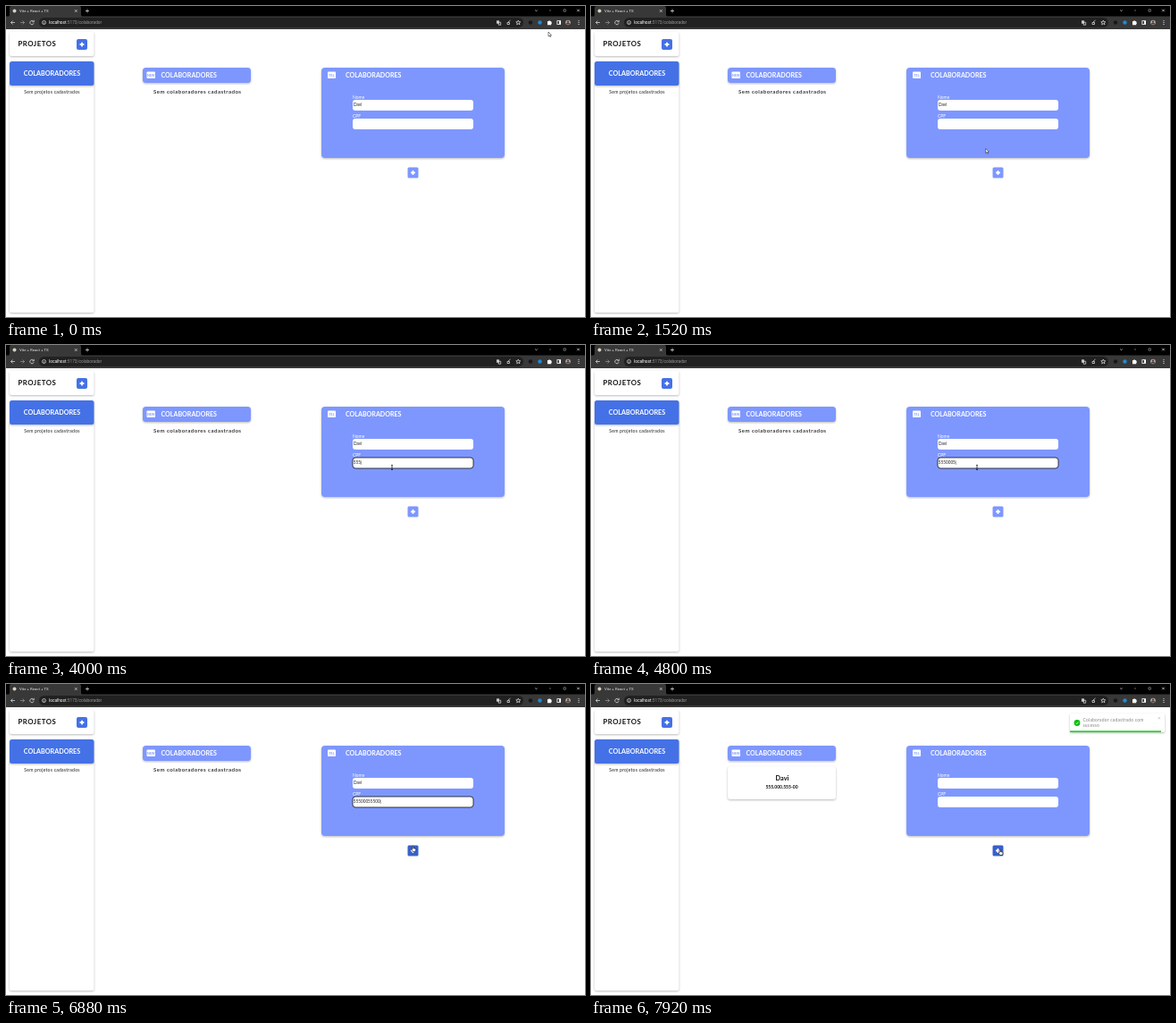
An HTML page that plays this animation: 648x348 px, repeating every 8 s.

```html
<!DOCTYPE html>
<html lang="pt">
<head>
<meta charset="utf-8">
<title>Colaboradores</title>
<style>
html, body { margin: 0; width: 100%; height: 100%; overflow: hidden; background: #fff; }
svg { display: block; width: 648px; height: 348px; font-family: Lato, "Open Sans", sans-serif; }
.ui { font-family: Roboto, "Open Sans", sans-serif; }
.b { font-weight: 700; }
.mid { text-anchor: middle; }
.card { filter: drop-shadow(0 1px .8px #0004); }
.line { fill: none; stroke: #e8eaed; stroke-width: .7; }
.plus { stroke: #fff; stroke-width: 1.8; stroke-linecap: round; }
</style>
</head>
<body>
<svg viewBox="0 0 648 348">
  <defs>
    <path id="plus" class="plus" d="M-1.7 0H1.7M0-1.7V1.7"/>
  </defs>

  <!-- browser -->
  <g class="ui">
    <path d="M0 0H648V12H0z"/>
    <path d="M0 11.5H648V26H0z" fill="#383838"/>
    <path d="M3 12Q4 11 4 9V2Q4 0 6 0H82Q84 0 84 2V9Q84 11 85 12z" fill="#383838"/>
    <circle cx="9.5" cy="5.5" r="2" fill="#d8d0c4"/>
    <text x="15" y="7.3" font-size="4.3" fill="#e8eaed">Vite + React + TS</text>
    <path class="line" d="M77 4.2l2.6 2.6m0-2.6l-2.6 2.6M89 5.5h4m-2-2v4M592.2 4.5l1.3 1.3 1.3-1.3M639.2 3.7l2.6 2.6m0-2.6l-2.6 2.6"/>
    <path class="line" stroke-opacity=".6" d="M608 5h2M624 3.8h2.4v2.4h-2.4z"/>
    <rect x="37" y="13" width="542" height="11" rx="5.5" fill="#212121"/>
    <path class="line" d="M10 18.5H5.5m2-2l-2 2 2 2"/>
    <path class="line" stroke-opacity=".55" d="M16 18.5h4.5m-2-2l2 2-2 2"/>
    <path class="line" d="M30.7 17.2a2.2 2.2 0 1 0 .4 2M31.3 15.8v2h-2"/>
    <circle cx="42.5" cy="18.5" r="2" class="line"/>
    <path class="line" d="M42.5 18.2v1.4"/>
    <text x="48" y="20.2" font-size="4.8" fill="#9a9a9a"><tspan fill="#fff">localhost</tspan>:5173/colaborador</text>
    <path d="M549 16.3h3v3.4h-3z" fill="#c4c4c4"/>
    <path class="line" d="M551.2 18.2h2.5v3h-2.5zM561 20.5v-2h2.5v2zM562 18l2.5-2M573.3 16l.7 1.7 1.8.1-1.4 1.2.5 1.8-1.6-1-1.6 1 .5-1.8-1.4-1.2 1.8-.1z"/>
    <circle cx="587" cy="18.5" r="2.2" fill="#17181b"/>
    <circle cx="597.5" cy="18.5" r="2.2" fill="#2089d5"/>
    <path d="M606 17h1.3a.8.8 0 0 1 1.6 0h1.3v1.3a.8.8 0 0 1 0 1.6v1.3H606z" fill="#fff"/>
    <path d="M616.5 16.2h4.5v4.6h-4.5z" fill="#fff"/>
    <path d="M617.3 17h1.8v3h-1.8z" fill="#383838"/>
    <circle cx="629" cy="18.5" r="2.8" fill="#b8a9a2"/>
    <path d="M626.8 20.5a2.2 2 0 0 1 4.4 0z" fill="#463a3a"/>
    <circle cx="629" cy="17.5" r="1.1" fill="#463a3a"/>
    <path d="M641 16.6v.1m0 1.8v.1m0 1.8v.1" stroke="#fff" stroke-linecap="round"/>
  </g>

  <!-- sidebar -->
  <g fill="#fff">
    <rect class="card" x="4" y="86" width="94.5" height="257" rx="2"/>
    <rect class="card" x="4" y="29" width="94.5" height="27" rx="2"/>
    <rect class="card" x="4" y="62" width="94.5" height="27" rx="2.5" fill="#4471e6"/>
    <rect x="79" y="37" width="12" height="12" rx="2" fill="#4471e6"/>
    <use href="#plus" x="85" y="43"/>
    <text class="b" x="13.5" y="45.3" font-size="7.8" letter-spacing=".5" fill="#111">PROJETOS</text>
    <text class="b mid" x="51.5" y="77.5" font-size="7.2">COLABORADORES</text>
    <text class="mid" x="51.5" y="98" font-size="5.1" letter-spacing=".22" fill="#222">Sem projetos cadastrados</text>
  </g>

  <!-- list -->
  <text id="empty" class="mid" x="214.2" y="98" font-size="6.2" letter-spacing=".44" font-weight="500" fill="#111">Sem colaboradores cadastrados</text>
  <g id="entry" class="mid b" fill="#111">
    <rect class="card" x="153" y="92" width="121" height="37" rx="3" fill="#fff"/>
    <text x="214" y="108" font-size="7.3">Davi</text>
    <text x="213.5" y="117.2" font-size="5">555.000.555-00</text>
  </g>
  <rect class="card" x="153" y="69" width="121" height="17" rx="3.5" fill="#7e97ff"/>

  <!-- form -->
  <rect class="card" x="353" y="69" width="205" height="101" rx="4" fill="#7e97ff"/>
  <g fill="#fff">
    <rect x="157.5" y="73.5" width="9.5" height="7.5" rx=".8"/>
    <rect x="360" y="73.5" width="9" height="7.5" rx=".8"/>
    <text class="b" x="173.5" y="79.5" font-size="7.1">COLABORADORES</text>
    <text class="b" x="380" y="79.5" font-size="7.1">COLABORADORES</text>
    <text x="388" y="104" font-size="5">Nome</text>
    <text x="388" y="125" font-size="5">CPF</text>
    <rect x="388" y="105" width="135" height="12" rx="3"/>
    <rect id="field" x="388" y="126" width="135" height="12" rx="3" stroke-width=".8"/>
  </g>
  <g class="b mid" font-size="3.6" fill="#7e97ff">
    <text x="162.3" y="78.6">NEW</text>
    <text x="364.5" y="78.6">TEL</text>
  </g>
  <g font-size="4.7" fill="#222">
    <text id="name" x="389" y="112.4">Davi</text>
    <text id="cpf" x="388.8" y="133.2"></text>
  </g>
  <path id="caret" d="M0 129.5v4.5" stroke="#000" stroke-width=".4"/>
  <rect id="add" x="449.5" y="180.5" width="12" height="12" rx="1.5"/>
  <use href="#plus" x="455.5" y="186.5"/>

  <!-- toast -->
  <g id="toast">
    <rect class="card" x="536" y="33" width="106" height="21" rx="1.5" fill="#fff"/>
    <circle cx="544" cy="43.5" r="3.4" fill="#07bc0c"/>
    <path d="M542.4 43.6l1.2 1.2 2.2-2.5" fill="none" stroke="#fff" stroke-width=".8"/>
    <g font-size="5" letter-spacing=".2" fill="#858585">
      <text x="550.5" y="42.3">Colaborador cadastrado com</text>
      <text x="550.5" y="48">sucesso</text>
    </g>
    <path d="M634.7 37l2.4 2.4m0-2.4l-2.4 2.4" stroke="#aaa" stroke-width=".5"/>
    <rect id="bar" x="536" y="52.3" height="1.7" fill="#22d32a"/>
  </g>

  <!-- pointers -->
  <g id="mouse" stroke-linejoin="round">
    <path id="arrow" d="M0 0V5l1.2-1 .8 1.7.8-.4-.8-1.6h1.5z" fill="#fff" stroke="#111" stroke-width=".5"/>
    <path id="beam" d="M-1-2.7Q0-2.7 0-2.1Q0-2.7 1-2.7M0-2.1V2.1M-1 2.7Q0 2.7 0 2.1Q0 2.7 1 2.7" fill="none" stroke="#000" stroke-width=".7"/>
    <path id="hand" d="M0 0q.6-.7 1.1 0v2.1l2.2.5q.8.3.7 1.2l-.5 2.2H.8L-1 3.7q.2-.8 1-.2z" fill="#fff" stroke="#000" stroke-width=".6"/>
  </g>
</svg>
<script>
const $ = id => document.getElementById(id);
const LOOP = 8000, FOCUS = 2160, BLUR = 7040, SAVED = 7120, TOAST = 7098;
const digits = "55500055500";
const keyTimes = [3200, 3440, 3680, 4080, 4320, 4400, 4720, 4960, 5200, 5520, 5600];
// time, x, y
const path = [
  [0, 607, 29], [640, 607, 29], [1040, 538, 80], [1440, 450, 148], [1520, 441.8, 159.5],
  [1600, 440, 162], [1840, 436, 150], [2160, 432, 137], [6160, 432, 137],
  [6560, 446, 166], [6960, 457, 185.5]
];
// bounce from the right: fraction of 700 ms, offset
const bounce = [[0, 1012], [.6, -8.4], [.75, 3.4], [.9, -1.7], [1, 0]];

const easeOut = u => 1 - (1 - u) ** 3;

function sample(keys, t, ease = u => u) {
  const i = keys.findIndex(k => k[0] > t);
  if (i < 0) return keys.at(-1).slice(1);
  const a = keys[i - 1], b = keys[i], u = ease((t - a[0]) / (b[0] - a[0]));
  return a.slice(1).map((v, n) => v + (b[n + 1] - v) * u);
}

const show = (id, on) => $(id).setAttribute("visibility", on ? "visible" : "hidden");
const move = (id, x, y) => $(id).setAttribute("transform", `translate(${x} ${y})`);

function draw(t) {
  const [x, y] = sample(path, t);
  const inside = (l, top, r, bottom) => x > l && x < r && y > top && y < bottom;
  const onField = inside(388, 105, 523, 117) || inside(388, 126, 523, 138);
  const onAdd = inside(449.5, 180.5, 461.5, 192.5);
  move("mouse", x, y);
  show("beam", onField);
  show("hand", onAdd);
  show("arrow", !onField && !onAdd);
  $("add").setAttribute("fill", onAdd ? "#3860cb" : "#7e97ff");

  const saved = t >= SAVED, focused = t >= FOCUS && t < BLUR;
  show("empty", !saved);
  show("entry", saved);
  show("name", !saved);
  const typed = keyTimes.filter(k => k <= t).length;
  $("cpf").textContent = saved ? "" : digits.slice(0, typed);
  $("field").setAttribute("stroke", focused ? "#101010" : "none");
  const since = t - (typed ? keyTimes[typed - 1] : FOCUS);
  show("caret", focused && since % 1000 < 500);
  move("caret", 389.2 + $("cpf").getComputedTextLength(), 0);

  const age = t - TOAST;
  show("toast", age >= 0);
  if (age >= 0) {
    move("toast", sample(bounce, age / 700, easeOut)[0], 0);
    $("toast").setAttribute("opacity", easeOut(Math.min(1, age / 420)));
    $("bar").setAttribute("width", 106 - age / 205);
  }
}

const start = performance.now();
function tick() {
  draw((performance.now() - start) % LOOP);
  requestAnimationFrame(tick);
}
tick();
</script>
</body>
</html>
```
